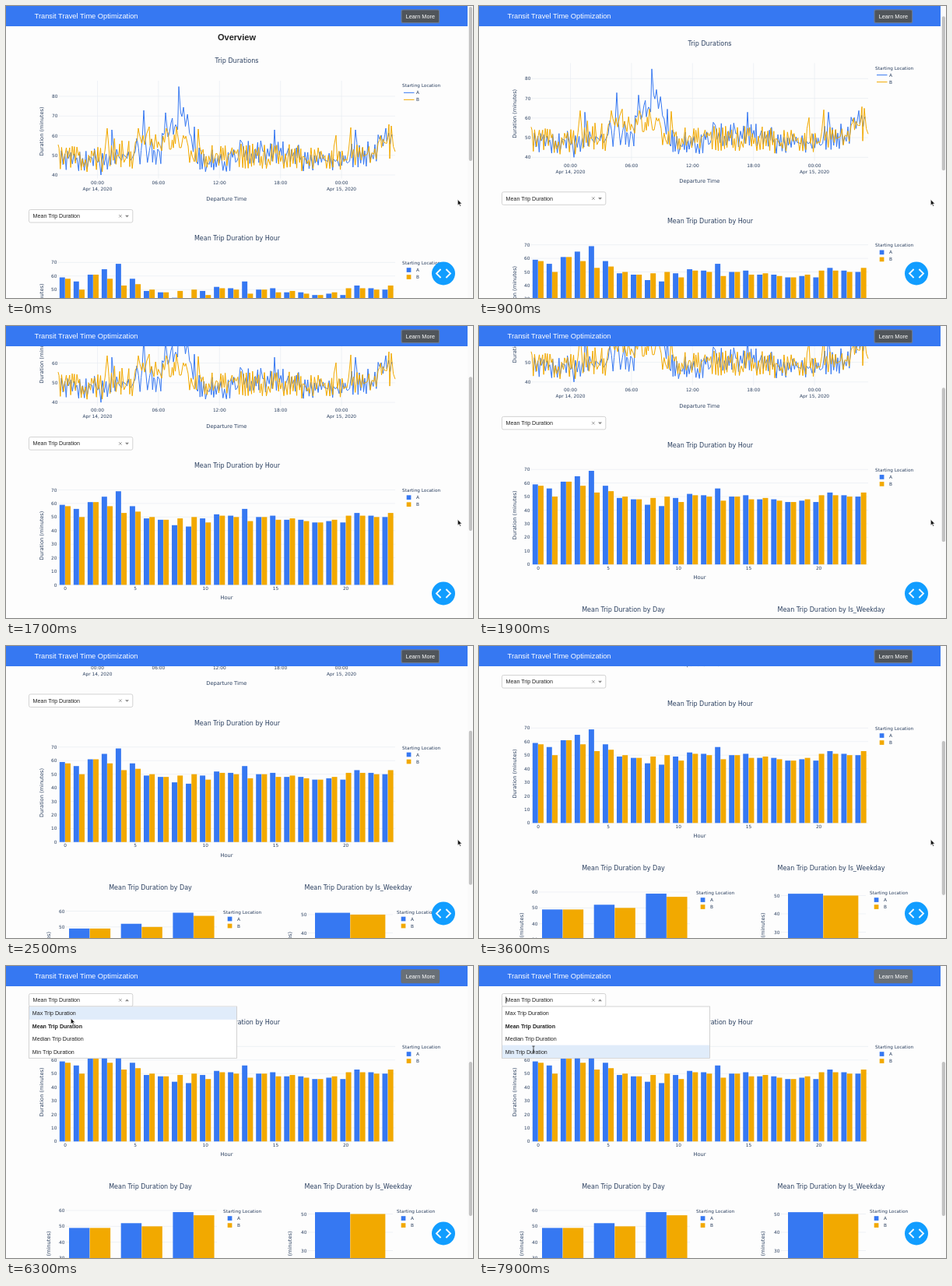
Animation of 600 by 375 pixels, one loop 8 s. Source, as an HTML page:

```html
<!DOCTYPE html>
<html lang="en">
<head>
<meta charset="utf-8">
<title>Transit Travel Time Optimization</title>
<style>
html, body { margin: 0; width: 100%; height: 100%; overflow: hidden; background: #fdfdfd; }
svg { display: block; width: 600px; height: 375px; }
text { font-family: "Liberation Sans", Arial, sans-serif; fill: #222; white-space: pre; }
.plot text { font-family: "DejaVu Sans", Verdana, sans-serif; fill: #2a3f5f; }
</style>
</head>
<body>
<svg id="stage" viewBox="0 0 600 375" xmlns="http://www.w3.org/2000/svg">
  <rect width="600" height="375" fill="#fdfdfd"/>
  <g id="page">
    <text x="296.5" y="44" font-size="11" font-weight="bold" text-anchor="middle">Overview</text>
    <g id="plots" class="plot"></g>
    <g id="select">
      <rect x="29.5" y="261.5" width="133.3" height="16.5" rx="2" fill="#fff" stroke="#c8c8c8" stroke-width=".8"/>
      <text x="34.6" y="272.3" font-size="7.1">Mean Trip Duration</text>
      <path d="M145.1 268l3.6 3.6m0-3.6l-3.6 3.6" stroke="#888" stroke-width=".8"/>
      <path id="arrow" fill="#888"/>
      <path id="caret" d="M34.7 265.5v8.5" stroke="#222" stroke-width=".8"/>
    </g>
    <g id="menu"></g>
  </g>
  <rect width="593" height="26" fill="#3678f2"/>
  <text x="36.6" y="16.3" font-size="9.3" style="fill:#fff">Transit Travel Time Optimization</text>
  <rect id="learn" x="508" y="4.9" width="48.6" height="16.8" rx="2" stroke-width="1.2"/>
  <text x="532.3" y="15.9" font-size="7.3" text-anchor="middle" style="fill:#fff">Learn More</text>
  <rect x="593" width="7" height="375" fill="#fafafa"/>
  <rect id="thumb" x="594.8" width="4.2" height="198" rx="2.1" fill="#c2c2c2"/>
  <circle cx="562" cy="343.5" r="15" fill="#119dff"/>
  <path d="M558.6 338l-5.6 5.5 5.6 5.5M565.4 338l5.6 5.5-5.6 5.5" fill="none" stroke="#fff" stroke-width="1.8"/>
  <path id="pointer" d="M0 0V7.6L1.8 6 3 8.8 4.2 8.3 3 5.6H5.4Z" fill="#111" stroke="#fff" stroke-width=".6"/>
  <path id="beam" d="M-1.6-4H1.6M0-4V4M-1.6 4H1.6M-1 1.2H1" fill="none" stroke="#222" stroke-width=".8"/>
</svg>
<script>
const NS = "http://www.w3.org/2000/svg";
const BLUE = "#3678f2", GOLD = "#f2a900", GRID = "#e9edf3";
const $ = id => document.getElementById(id);
const plots = $("plots");

function add(parent, tag, attrs, content) {
  const el = document.createElementNS(NS, tag);
  for (const k in attrs) el.setAttribute(k, attrs[k]);
  if (content !== undefined) el.textContent = content;
  parent.appendChild(el);
  return el;
}
const label = (s, x, y, size, anchor = "middle") =>
  add(plots, "text", { x, y, "font-size": size, "text-anchor": anchor }, s);
const rule = d => add(plots, "path", { d, stroke: GRID, "stroke-width": .7 });
const box = (x, y, width, height, fill) => add(plots, "rect", { x, y, width, height, fill });

function sideTitle(x, y) {
  label("Duration (minutes)", 0, 0, 6.65).setAttribute("transform", `translate(${x} ${y}) rotate(-90)`);
}

function legend(x, y, lines) {
  label("Starting Location", x, y + 2.1, 5.75, "start");
  [["A", BLUE], ["B", GOLD]].forEach(([name, color], i) => {
    const cy = y + 9 * (i + 1);
    if (lines) box(x + 2, cy - .5, 13.5, 1, color);
    else box(x + 5.7, cy - 2.8, 5.7, 5.7, color);
    label(name, x + 18, cy + 2.1, 5.8, "start");
  });
}

function bars(o) {
  const yOf = v => o.zero - v * o.unit;
  for (let v = 0; v <= o.max; v += 10) {
    rule(`M${o.left} ${yOf(v)}H${o.right}`);
    label(v, o.left - 1.5, yOf(v) + 2.1, 5.8, "end");
  }
  o.a.forEach((v, i) => {
    const x = o.x + i * o.step;
    box(x, yOf(v), o.w - .25, v * o.unit, BLUE);
    box(x + o.w, yOf(o.b[i]), o.w - .25, o.b[i] * o.unit, GOLD);
  });
}

function random(seed) {
  return () => (seed = (seed * 16807) % 2147483647) / 2147483647;
}

// Jagged vertices between a low and a high edge, broken by a few peaks [x, y].
function trace(color, seed, start, peaks, bands) {
  const rnd = random(seed), pts = [start];
  let i = 0, x = start[0];
  const jag = end => {
    while ((x += 1.1 + rnd() * 1.6) < end) {
      const [, low, high] = bands.find(b => x < b[0]);
      const r = rnd() ** 1.5 * .65;
      pts.push([x, low + (high - low) * (i++ % 2 ? r : 1 - r)]);
    }
  };
  for (const p of peaks) {
    jag(p[0] - 1.2);
    pts.push(p);
    x = p[0];
  }
  const d = "M" + pts.map(p => p.map(v => v.toFixed(1)).join(" ")).join("L");
  add(plots, "path", { d, fill: "none", stroke: color, "stroke-width": 1, "stroke-linejoin": "round" });
}

// Line chart
label("Trip Durations", 296.5, 73.4, 8);
[40, 50, 60, 70, 80].forEach(v => {
  const y = 217 - (v - 40) * 2.525;
  rule(`M67 ${y}H500`);
  label(v, 66.5, y + 2.1, 5.8, "end");
});
["00:00", "06:00", "12:00", "18:00", "00:00"].forEach((s, i) => {
  const x = 117.5 + i * 78.4;
  rule(`M${x} 96V221.5`);
  label(s, x, 229.2, 5.85);
  if (i % 4 === 0) label(i ? "Apr 15, 2020" : "Apr 14, 2020", x, 237.2, 5.85);
});
label("Departure Time", 283.3, 249.7, 6.65);
sideTitle(47.8, 161);
trace(BLUE, 71, [70, 202],
  [[122, 217], [136, 159], [157, 187], [166, 187], [168, 170], [175, 173], [177, 134], [179, 171], [187, 171],
   [191, 187], [197, 187], [205, 137], [208, 168], [212, 150], [215, 165], [222, 103.5], [226, 142], [228, 130],
   [244, 199], [301, 172], [345, 159], [449, 159], [488, 157], [496, 165]],
  [[134, 212, 182], [200, 204, 182], [212, 170, 155], [237, 165, 137], [244, 190, 155], [298, 213, 182],
   [378, 204, 173], [440, 212, 187], [476, 207, 174], [500, 180, 163]]);
trace(GOLD, 2024, [67, 178],
  [[74, 203], [130, 157], [170, 157], [184, 155], [190, 184], [200, 186], [206, 157], [212, 184], [219, 155],
   [223, 182], [234, 180], [242, 200], [247, 158], [424, 166], [443, 156], [492, 152], [493, 196], [495, 154], [500, 187]],
  [[127, 213, 180], [164, 209, 170], [234, 184, 163], [378, 209, 177], [440, 212, 180], [476, 207, 178], [500, 184, 163]]);
legend(509, 102.3, true);

// Hourly bars
label("Mean Trip Duration by Hour", 297, 301.3, 8);
bars({
  left: 67, right: 500, zero: 451.3, unit: 1.742, max: 70, x: 68.8, step: 18.03, w: 7.2,
  a: [59, 56, 61, 65, 69, 58, 49, 48, 44, 43, 49, 52, 51, 56, 50, 51, 48, 48, 46, 47, 46, 53, 51, 50],
  b: [58, 50, 61, 58, 53, 54, 50, 48, 49, 50, 46, 51, 50, 47, 50, 48, 49, 47, 46, 48, 51, 51, 50, 53]
});
for (let h = 0; h <= 20; h += 5) label(h, 76 + h * 18.03, 457.7, 5.8);
label("Hour", 283.5, 470.2, 6.65);
sideTitle(47.8, 388);
legend(509, 330, false);

// Daily and weekday bars
label("Mean Trip Duration by Day", 185.5, 512.2, 8);
bars({
  left: 77, right: 271, zero: 662, unit: 2.033, max: 60, x: 81, step: 66.7, w: 26.7,
  a: [49, 52, 59], b: [49, 50, 57]
});
sideTitle(56.5, 598);
legend(279, 541, false);
label("Mean Trip Duration by Is_Weekday", 452.5, 512.2, 8);
bars({
  left: 388, right: 497, zero: 662, unit: 2.35, max: 50, x: 397, step: 100, w: 45.3,
  a: [51], b: [50]
});
sideTitle(367, 598);
legend(502, 541, false);

// Dropdown menu
const menu = $("menu");
add(menu, "rect", { x: 29.5, y: 278, width: 267, height: 66.3, fill: "#fff", stroke: "#c8c8c8", "stroke-width": .8 });
const hot = add(menu, "rect", { x: 30, width: 266, height: 16.4, fill: "#e0ecfa" });
["Max", "Mean", "Median", "Min"].forEach((s, i) => add(menu, "text", {
  x: 33.8, y: 289.3 + i * 16.4, "font-size": 7.1, "font-weight": i === 1 ? "bold" : "normal"
}, s + " Trip Duration"));

// Motion: [time, offset, speed] and [time, x, y]
const scrollKeys = [[100, 0, 0], [1200, 49, .11], [1900, 145, .115], [2500, 199.5, .05], [3600, 224, .01], [3900, 226, 0]];
const mouseKeys = [[4450, 580.3, 248.5], [5400, 96, 42], [5750, 96, 42], [6200, 83.3, 67], [6500, 83.3, 67], [7850, 70, 107]];
const OPEN = 5600, LOOP = 8000;

function between(keys, t) {
  if (t <= keys[0][0]) return [keys[0], keys[0], 0];
  for (let i = 1; i < keys.length; i++) {
    const a = keys[i - 1], b = keys[i];
    if (t < b[0]) return [a, b, (t - a[0]) / (b[0] - a[0])];
  }
  const end = keys[keys.length - 1];
  return [end, end, 0];
}

function scrollAt(t) {
  const [a, b, u] = between(scrollKeys, t), dt = b[0] - a[0], v = 1 - u;
  return a[1] * v * v * (1 + 2 * u) + b[1] * u * u * (3 - 2 * u) + dt * u * v * (a[2] * v - b[2] * u);
}

function mouseAt(t) {
  const [a, b, u] = between(mouseKeys, t), e = u * u * (3 - 2 * u);
  return [a[1] + (b[1] - a[1]) * e, a[2] + (b[2] - a[2]) * e];
}

const show = (el, on) => el.setAttribute("visibility", on ? "visible" : "hidden");

function draw(t) {
  const scroll = scrollAt(t), [mx, my] = mouseAt(t), open = t >= OPEN, text = t >= 7000;
  $("page").setAttribute("transform", `translate(0 ${-scroll})`);
  $("thumb").setAttribute("y", 1 + scroll * .54);
  $("learn").setAttribute("fill", open ? "#697077" : "#50555a");
  $("learn").setAttribute("stroke", open ? "#697077" : "#687995");
  $("arrow").setAttribute("d", open ? "M153 271.2h5l-2.5-2.7z" : "M153 268.7h5l-2.5 2.7z");
  show($("caret"), open && (t - OPEN) % 1000 < 500);
  show(menu, open);
  const item = my < 52 ? 1 : Math.min(3, Math.floor((my - 52) / 16.4));
  hot.setAttribute("y", 278.4 + item * 16.4);
  for (const id of ["pointer", "beam"]) {
    $(id).setAttribute("transform", `translate(${mx} ${my})`);
    show($(id), (id === "beam") === text);
  }
}

const start = performance.now();
function tick() {
  draw((performance.now() - start) % LOOP);
  requestAnimationFrame(tick);
}
draw(0);
requestAnimationFrame(tick);
</script>
</body>
</html>
```
